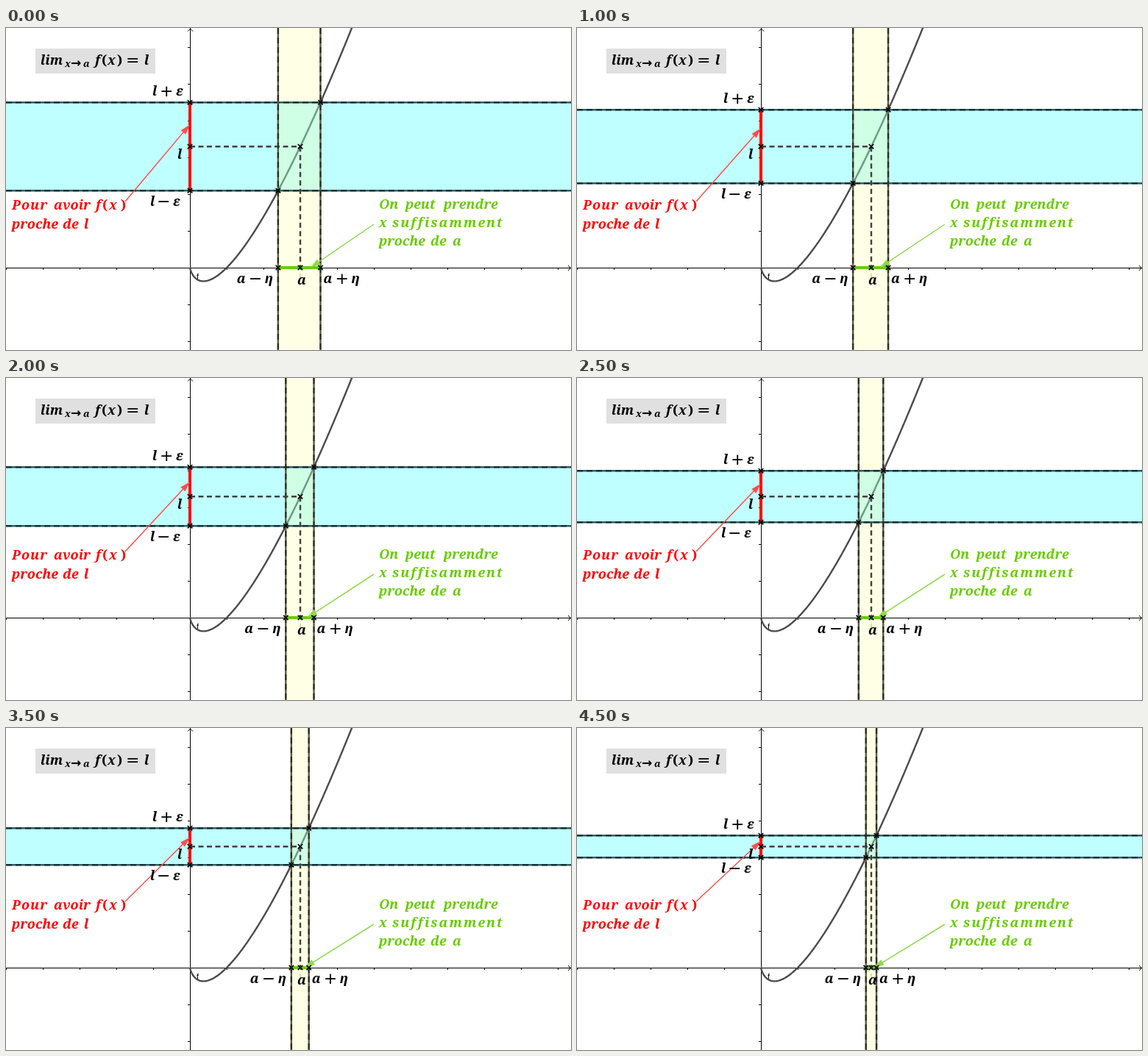
Animation, 768 px wide and 438 px high, one loop 5000 ms. Source, as an HTML page:

```html
<!DOCTYPE html>
<html lang="fr">
<head>
<meta charset="utf-8">
<style>
  html, body { margin: 0; width: 100%; height: 100%; overflow: hidden; background: #fff; }
  svg { display: block; width: 768px; height: 438px; }
  text { font: italic bold 18px "Noto Serif", serif; white-space: pre; }
  text.up { font-style: normal; }
  text.op { font: 22px "DejaVu Sans", sans-serif; }
  text.sub { font-size: 13px; }
  text.arrow { font: bold 17px "DejaVu Sans", sans-serif; }
  text.small { font: 11px "Liberation Sans", sans-serif; }
  text.loose { letter-spacing: 2px; }
  text.wide { letter-spacing: 1px; }
</style>
</head>
<body>
<svg id="stage" viewBox="0 0 768 438"></svg>
<script>
const STEP = 500, STEPS = 10;
const UNIT = 50, OX = 250, OY = 326, A = 3;
const RED = '#ff0000', GREEN = '#66cc00';

const f = x => x > 0 ? x * Math.log(x) : 0;
const L = f(A);
const px = x => OX + x * UNIT;
const py = y => OY - y * UNIT;

// Newton's method for x ln x = y
function inverse(y) {
  let x = A;
  for (let i = 0; i < 8; i++) x -= (f(x) - y) / (Math.log(x) + 1);
  return x;
}

const line = (x1, y1, x2, y2, color, width, extra = '') =>
  `<line x1="${x1}" y1="${y1}" x2="${x2}" y2="${y2}" stroke="${color}" stroke-width="${width}" ${extra}/>`;
const rect = (x, y, w, h, fill) =>
  `<rect x="${x}" y="${y}" width="${w}" height="${h}" fill="${fill}"/>`;
const path = (d, stroke, width, fill = 'none') =>
  `<path d="${d}" stroke="${stroke}" stroke-width="${width}" fill="${fill}"/>`;
const cross = (x, y) =>
  path(`M${x - 3.2} ${y - 3.2}l6.4 6.4m0-6.4l-6.4 6.4`, '#000', 1.7);

// Each piece is [string, x, class]
const write = (y, pieces, color = '#000') => pieces.map(([s, x, cls = '']) =>
  `<text x="${x}" y="${cls === 'op' ? y + 1 : y}" class="${cls}" fill="${color}">${s}</text>`).join('');

const sum = (x, y, first, sign, last, gap) =>
  write(y, [[first, x], [sign, x + gap - 2, 'op'], [last, x + gap + 20]]);

function arrow(x1, y1, x2, y2, color) {
  const angle = Math.atan2(y2 - y1, x2 - x1) * 180 / Math.PI;
  const length = Math.hypot(x2 - x1, y2 - y1);
  return `<g transform="translate(${x2} ${y2}) rotate(${angle})">` +
    line(-length, 0, -10, 0, color, 1.5) +
    `<path d="M0 0L-14 -4.2V4.2Z" fill="${color}"/></g>`;
}

function axes() {
  let s = line(0, OY + .5, 768, OY + .5, '#000', 1) + line(OX + .5, 0, OX + .5, 438, '#000', 1);
  for (let x = .5; x < 768; x += UNIT) s += line(x, OY, x, OY + 3, '#000', 1);
  for (let y = 26.5; y < 438; y += UNIT) s += line(OX - 3, y, OX, y, '#000', 1);
  return s + path('M247 4.5L250.5 1L254 4.5M764 323L767.5 326.5L764 330', '#000', 1);
}

function curve() {
  let d = `M${OX} ${OY}`;
  for (let x = .02; x <= 4.5; x += .02) d += `L${px(x).toFixed(2)} ${py(f(x)).toFixed(2)}`;
  return path(d, '#4b4b4b', 2.4);
}

// Band edge: a tinted solid line under dark dashes
const edge = (x1, y1, x2, y2, tint) =>
  line(x1, y1, x2, y2, tint, 2.4) +
  line(x1, y1, x2, y2, '#000', 2.4, 'stroke-dasharray="8 5" opacity=".5"');

const backdrop = axes() + write(342, [['f', 259, 'small']]) + curve();

const captions =
  rect(40, 28, 163, 34, '#e0e0e0') +
  write(50, [['lim', 47], ['f', 121], ['(', 130, 'up'], ['x', 138], [')', 151, 'up'], ['=', 163, 'op'], ['l', 188]]) +
  write(53, [['x', 80, 'sub'], ['→', 88, 'arrow'], ['a', 105, 'sub']]) +
  write(247, [['Pour', 8, 'wide'], ['avoir', 65], ['f', 122], ['(', 131, 'up'], ['x', 140], [')', 156, 'up']], RED) +
  write(273, [['proche', 8], ['de', 77], ['l', 106]], RED) +
  write(246, [['On', 507], ['peut', 543], ['prendre', 595]], GREEN) +
  write(271, [['x', 507], ['suffisamment', 525, 'loose']], GREEN) +
  write(296, [['proche', 507], ['de', 577], ['a', 607]], GREEN) +
  write(178, [['l', 233]]) + write(349, [['a', 396]]);

function scene(epsilon) {
  const top = py(L + epsilon), bottom = py(L - epsilon), mid = py(L);
  const left = px(inverse(L - epsilon)), right = px(inverse(L + epsilon)), center = px(A);
  const points = [
    [OX, top], [OX, mid], [OX, bottom], [center, mid], [right, top],
    [left, bottom], [left, OY], [center, OY], [right, OY]
  ];
  const dash = 'stroke-dasharray="7 4.5"';
  return backdrop +
    rect(0, top, 768, bottom - top, 'rgba(0,255,255,.25)') +
    rect(left, 0, right - left, 438, 'rgba(255,255,150,.25)') +
    edge(0, top, 768, top, '#2b6066') + edge(0, bottom, 768, bottom, '#2b6066') +
    edge(left, 0, left, 438, '#5c5c44') + edge(right, 0, right, 438, '#5c5c44') +
    line(OX, mid, center, mid, '#404040', 2.4, dash) +
    line(center, mid, center, OY, '#404040', 2.4, dash) +
    line(center, 334, center, 341, '#8cdd33', 1) +
    line(OX, top, OX, bottom, RED, 4) +
    line(left, OY, right, OY, GREEN, 4) +
    arrow(162, 236, OX, (top + mid) / 2, '#ff4d4d') +
    arrow(500, 267, (center + right) / 2, OY, '#8fd94d') +
    points.map(p => cross(...p)).join('') +
    captions +
    sum(199, top - 9, 'l', '+', 'ε', 12) +
    sum(196, bottom + 21, 'l', '−', 'ε', 11) +
    sum(left - 56, 347, 'a', '−', 'η', 18) +
    sum(right + 4, 347, 'a', '+', 'η', 18);
}

const stage = document.getElementById('stage');
let shown = -1;
function draw(now) {
  const step = Math.floor(now / STEP) % STEPS;
  if (step !== shown) {
    stage.innerHTML = scene((12 - step) / 10);
    shown = step;
  }
}
const start = performance.now();
function tick() {
  draw(performance.now() - start);
  requestAnimationFrame(tick);
}
tick();
</script>
</body>
</html>
```
